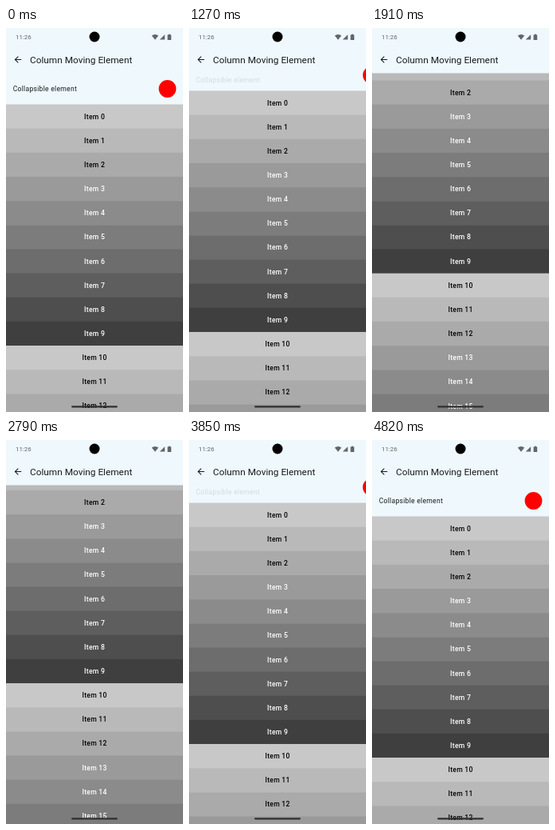
Recreate the animation shown at these times as an HTML page. Size 222 by 480 pixels, loop 5030 ms.

```html
<!DOCTYPE html>
<html lang="en">
<head>
<meta charset="utf-8">
<title>Column Moving Element</title>
<style>
  html, body { margin: 0; width: 100%; height: 100%; overflow: hidden; background: #eff8fd; }
  svg { display: block; width: 100%; height: 100%; font-family: Roboto, sans-serif; }
  .body { font-size: 8.6px; letter-spacing: .27px; }
  #list text { font-weight: 500; text-anchor: middle; }
</style>
</head>
<body>
<svg viewBox="0 0 222 480">
  <rect width="222" height="480" fill="#eff8fd"/>
  <g id="list" class="body"></g>
  <rect width="222" height="56.5" fill="#eff8fd"/>

  <g fill="#626669">
    <text x="12" y="14.3" font-size="7.9">11:26</text>
    <path d="M182.8 9.6Q187 6.2 191.2 9.6L187 14.8Z"/>
    <path d="M192.8 14.6L199.2 8.2V14.6Z"/>
    <path d="M202.6 8.6H203.8V7.7H206V8.6H207.2V15H202.6Z"/>
  </g>
  <circle cx="111" cy="11" r="6.5"/>
  <path transform="translate(8.5 33) scale(.538)" fill="#171c1f"
    d="M20 11H7.83l5.59-5.59L12 4l-8 8 8 8 1.41-1.41L7.83 13H20z"/>
  <text x="30" y="43.5" font-size="11.84" fill="#171c1f">Column Moving Element</text>

  <text id="label" class="body" x="8.7" y="79" fill="#171c1f">Collapsible element</text>
  <circle id="dot" cx="202.5" cy="76" r="10.9" fill="#f00"/>
  <rect x="82" y="472.2" width="58" height="2.2" rx="1.1" fill="#303030"/>
</svg>
<script>
const LOOP = 5030, ROW = 30.15, TOP = 95.5, COUNT = 17;
const [list, label, dot] = ['list', 'label', 'dot'].map(id => document.getElementById(id));

let rows = '';
for (let i = 0; i < COUNT; i++) {
  const shade = Math.round(200 - (i % 10) * 15.2);
  const y = TOP + i * ROW;
  // A slight overlap keeps seams closed while scrolling.
  rows += `<rect y="${y}" width="222" height="${ROW + .5}" fill="rgb(${shade},${shade},${shade})"/>
    <text x="111.1" y="${y + 18.1}" fill="${i % 10 < 3 ? '#000' : '#fff'}">Item ${i}</text>`;
}
list.innerHTML = rows;

// Finger drag: [time in ms, scroll in px]
const keys = [[0, 0], [550, 0], [1090, 12], [1270, 17], [1640, 43], [1910, 90.3], [2060, 93.1],
  [2760, 93.1], [3300, 65], [3850, 17], [4390, 1.3], [4610, 0], [LOOP, 0]];
const rise = keys.slice(1).map(([t, s], i) => (s - keys[i][1]) / (t - keys[i][0]));
const slope = keys.map((_, i) => {
  const a = rise[i - 1] || 0, b = rise[i] || 0;
  return a * b > 0 ? 2 * a * b / (a + b) : 0;
});

// Monotone cubic through the keys
function scrollAt(time) {
  const i = keys.findIndex(k => k[0] > time) - 1;
  const [t0, s0] = keys[i], [t1, s1] = keys[i + 1];
  const d = t1 - t0, u = (time - t0) / d, v = 1 - u;
  return s0 * v * v * (1 + 2 * u) + s1 * u * u * (3 - 2 * u)
    + d * u * v * (slope[i] * v - slope[i + 1] * u);
}

function move(el, x, y) {
  el.setAttribute('transform', `translate(${x} ${y})`);
}

function draw() {
  const s = scrollAt(performance.now() % LOOP);
  const fold = Math.min(s, 39);
  move(list, 0, -s);
  move(label, 0, -.65 * fold);
  label.setAttribute('opacity', Math.max(0, 1 - fold / 19.5));
  move(dot, 1.55 * fold, -fold);
  requestAnimationFrame(draw);
}
draw();
</script>
</body>
</html>
```
